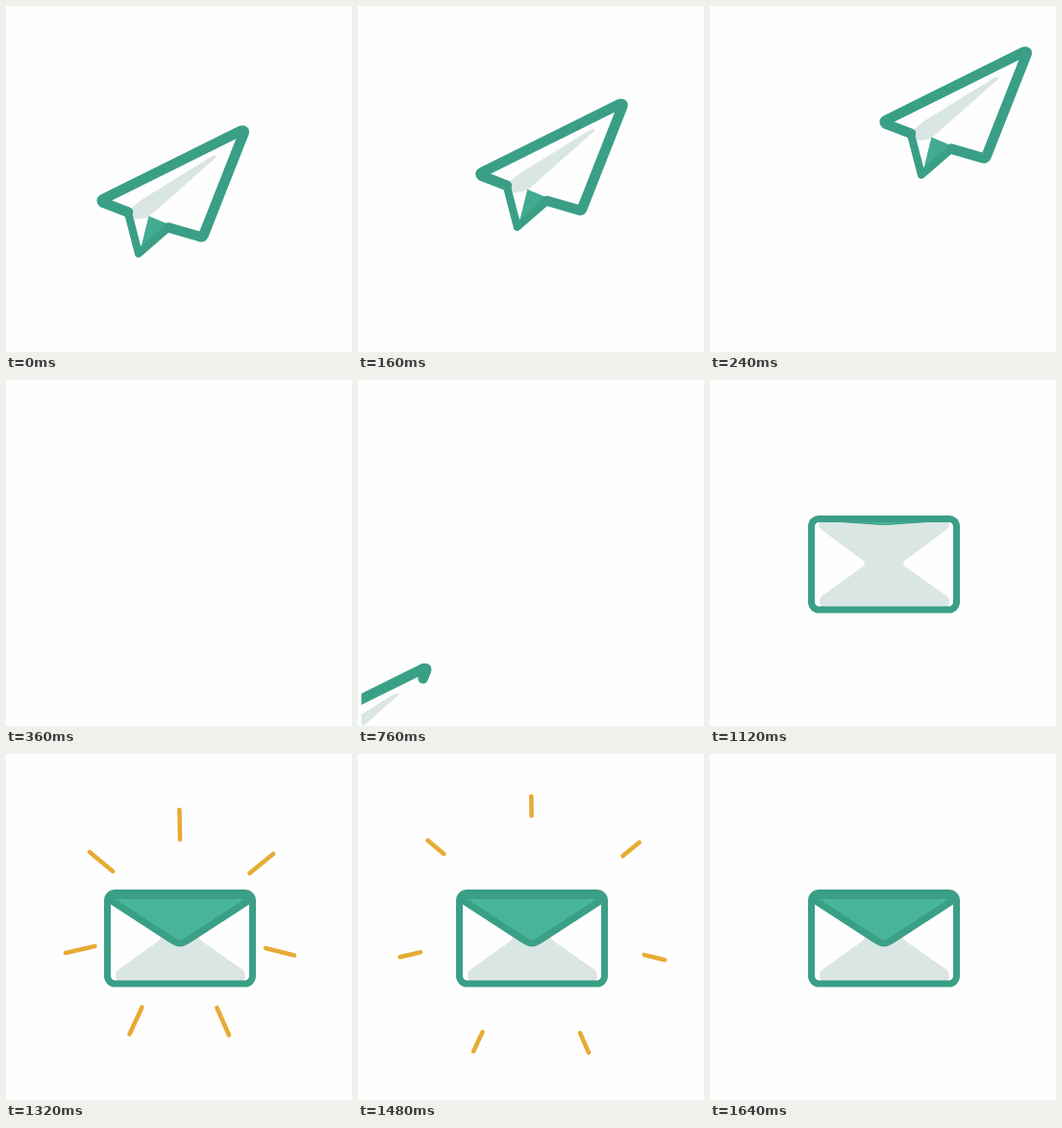
Write an HTML page that moves like this. It is 360x360 px and loops after 2920 ms.

```html
<!DOCTYPE html>
<html lang="en">
<head>
<meta charset="utf-8">
<title>Message sent</title>
<style>
  html, body { margin: 0; width: 100%; height: 100%; overflow: hidden; background: #fefefe; }
  svg { display: block; width: 100%; height: 100%; }
  path, rect { stroke-linecap: round; stroke-linejoin: round; }
  .line { fill: none; }
  .pale { fill: #dae6e3; }
  .edge { stroke: #3a9f86; }
  #rays { stroke: #e7ab35; stroke-width: 4.6; fill: none; }
</style>
</head>
<body>
<svg viewBox="0 0 360 360">
  <defs>
    <clipPath id="stage"><rect x="3.5" y="10" width="353.5" height="349"/></clipPath>
  </defs>
  <g clip-path="url(#stage)">
    <g id="plane">
      <path fill="#fefefe" d="M100 202L247.500 129.500L204 240.500L169 230L138 258L127 214Z"/>
      <path class="pale" d="M128 213Q134 206 142 201L214 156.500Q220 154 218 158L149 219Q138 223 132 221Z"/>
      <path fill="#43ab92" d="M148.500 218.500L170 227.500L139 257Z"/>
      <path class="line edge" id="hull" stroke-width="10.6" d="M127 214.500L101 204.500Q98.500 202.500 101 201L244 130Q248.500 128.500 247.500 132L205.500 238.500Q204.500 241 202 240L169 230.500"/>
      <path class="line edge" stroke-width="8.2" d="M127 215L138 257.500L168.500 231"/>
    </g>
  </g>
  <g id="mail">
    <rect x="105.500" y="144.500" width="151" height="94.500" rx="8" fill="#fefefe"/>
    <path class="pale" d="M114 148H248Q250 152 247 155L204 187Q198 190.500 204 195L247 225Q251 230 247 236H116Q112 230 116 225L158 195Q164 190.500 158 187L115 155Q112 152 114 148Z"/>
    <g id="flap">
      <path class="edge" fill="#48b59b" stroke-width="7" d="M109 147.500L107 151L174 194.500Q181 199.500 188 194.500L255 151L253 147.500Z"/>
    </g>
    <rect class="edge" x="105.500" y="144.500" width="151" height="94.500" rx="8" fill="none" stroke-width="7"/>
  </g>
  <g id="rays"></g>
</svg>
<script>
const LOOP = 2920, STEP = 40;
const $ = id => document.getElementById(id);
const plane = $('plane'), hull = $('hull'), mail = $('mail'), flap = $('flap'), rays = $('rays');

// inner x, inner y, outer x, outer y, final reach
const RAYS = [
  [181, 89, 180.5, 58, 1.6], [111, 122, 87, 102, 1.8], [253.5, 124, 278, 104, 1.8],
  [92.5, 200, 62, 207, 1.8], [270, 202, 300, 209.5, 1.85],
  [141.5, 263.5, 128.5, 291.5, 1.85], [219.5, 264, 232, 292.5, 1.85]
];
const lines = RAYS.map(() =>
  rays.appendChild(document.createElementNS('http://www.w3.org/2000/svg', 'path')));

const clamp = x => Math.min(1, Math.max(0, x));
const easeOut = x => 1 - (1 - x) ** 2;
const easeInOut = x => x * x * (3 - 2 * x);
const travel = n => 0.685 * Math.max(0, n) ** 2.67;
const show = (el, on) => el.style.display = on ? '' : 'none';
const scaleAt = (x, y, sx, sy = sx) =>
  `translate(${x} ${y}) scale(${sx} ${sy}) translate(${-x} ${-y})`;

function drawPlane(frame) {
  const n = frame - 19, leaving = frame < 9;
  const dx = leaving ? travel(frame) : -travel(8 - n);
  const dy = leaving ? -dx : -dx * 0.965;
  const size = leaving ? 1 : 1 - clamp((n - 3) / 5) ** 2;
  show(plane, leaving || (n >= 0 && size > 0));
  plane.setAttribute('transform', `translate(${dx} ${dy}) ${scaleAt(174, 193, size)}`);
  hull.setAttribute('stroke-dasharray', n === 0 ? '206 999' : 'none');
}

function drawMail(frame) {
  const n = frame - 19;
  const size = easeOut(clamp((n - 2) / 6));
  const fold = easeInOut(clamp((n - 8) / 5));
  show(mail, size > 0);
  show(flap, fold > 0);
  mail.setAttribute('transform', scaleAt(181, 191.75, size));
  flap.setAttribute('transform', scaleAt(181, 145, 1, fold));
}

function drawRays(frame) {
  const n = frame - 33;
  show(rays, n >= 0 && n < 8);
  const p = clamp(n / 8);
  RAYS.forEach(([x, y, u, v, reach], i) => {
    const at = k => `${x + (u - x) * k} ${y + (v - y) * k}`;
    const from = reach * easeInOut(p), to = 1 + (reach - 1) * easeOut(p);
    lines[i].setAttribute('d', `M${at(from)}L${at(to)}`);
  });
}

const start = performance.now();
function tick() {
  const frame = Math.floor((performance.now() - start) % LOOP / STEP);
  drawPlane(frame);
  drawMail(frame);
  drawRays(frame);
  requestAnimationFrame(tick);
}
tick();
</script>
</body>
</html>
```
